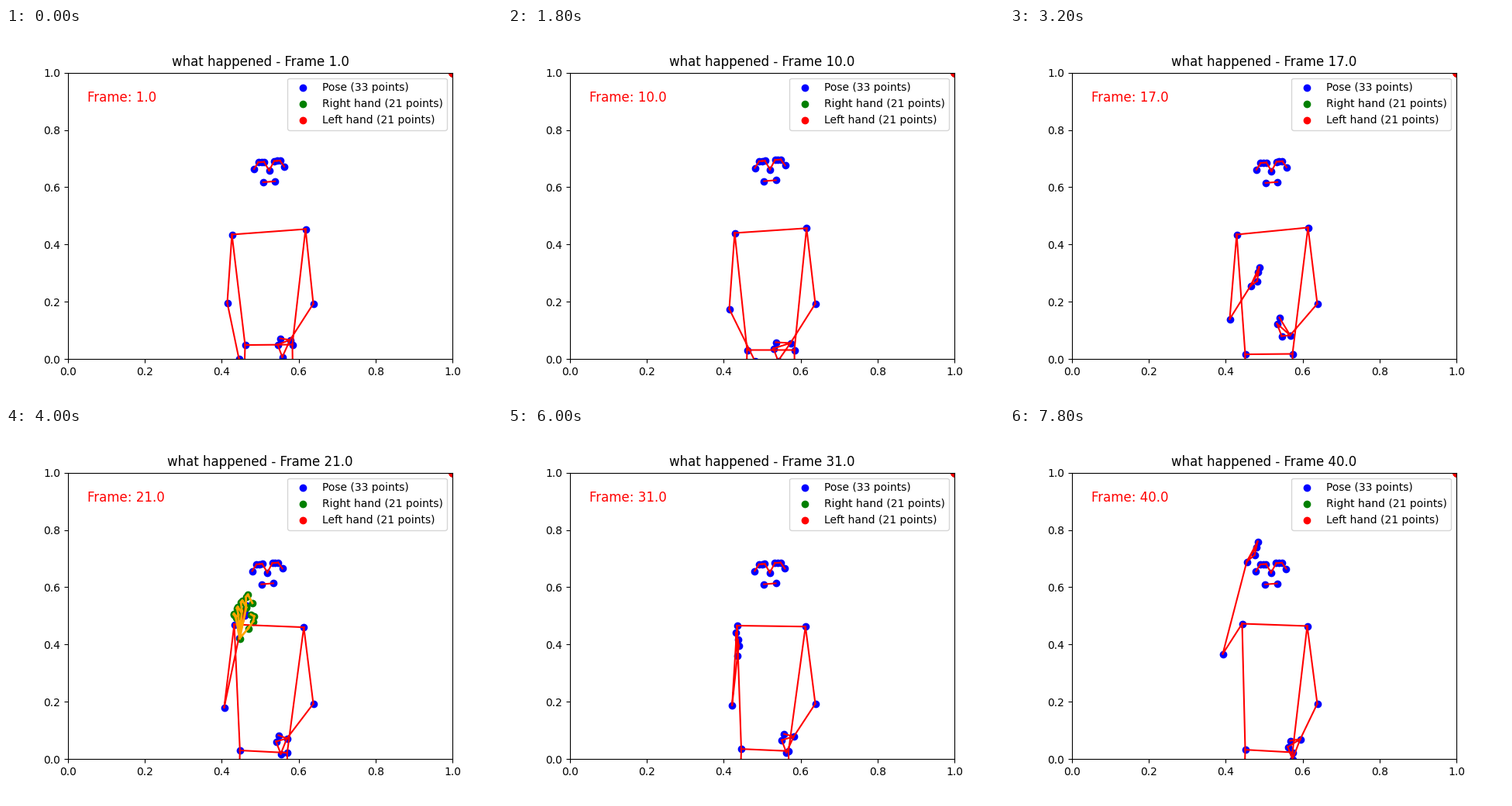
Write a matplotlib script that moves like this. It is 640 px wide and 480 px high and loops after 8000 ms.

```python
import matplotlib.pyplot as plt
import numpy as np
from matplotlib.animation import FuncAnimation

FRAMES = 40
STEP_MS = 200
HAND_SEEN = range(20, 27)

# Paths of the driving points: counter value -> stage pixels (y down).
# Every other joint follows from these by the rules in body_pose.
HEAD = {1: (339, -2.6), 10: (337.5, -4), 17: (336.9, -1.7), 21: (336.7, 0),
        35: (337.5, 0), 40: (336.4, 0.2)}
L_SHOULDER = {1: (386, 259), 17: (384, 257), 40: (383, 255)}
R_SHOULDER = {1: (291, 266), 10: (292, 264), 17: (292, 266), 21: (294, 253),
              27: (296, 252), 35: (294, 257), 40: (299, 252)}
L_HIP = {1: (369, 408), 10: (369, 415), 17: (364, 420), 27: (361, 416), 40: (364, 418)}
L_WRIST = {1: (366, 402), 10: (364, 406), 17: (361, 396), 21: (362, 400),
           35: (371, 397), 40: (374, 401)}
L_PALM = {1: (0, 1), 10: (-6, 2), 17: (-1, -20), 21: (2, -1), 35: (0, 0), 40: (0, 5)}
R_ELBOW = {1: (285, 354), 10: (285, 362), 17: (283, 375), 21: (281, 360),
           27: (284, 354), 35: (292, 360), 40: (274, 291)}
R_WRIST = {1: (300, 426), 10: (318, 429), 17: (310, 332), 21: (300, 270),
           27: (301, 306), 35: (290, 266), 40: (305, 172)}
R_INDEX = {1: (6, 28), 10: (16, 18), 17: (11, -24), 21: (9, -42),
           27: (4, -20), 35: (-6, -40), 40: (14, -26)}

BODY_LINKS = [
    (0, 1), (1, 2), (2, 3), (3, 7), (0, 4), (4, 5), (5, 6), (6, 8), (9, 10),
    (11, 12), (11, 23), (12, 24), (23, 24), (23, 25), (24, 26), (11, 13), (12, 14),
]
# Each arm ends in a wrist with pinky, index and thumb
for s in (0, 1):
    BODY_LINKS += [(13 + s, 15 + s), (15 + s, 17 + s), (15 + s, 19 + s),
                   (15 + s, 21 + s), (17 + s, 19 + s)]
HAND_LINKS = [(4 * f + j if j else 0, 4 * f + j + 1)
              for f in range(5) for j in range(4)]
CORNER = np.ones((21, 2))


def glide(path, t):
    """Smooth curve through the path's points without overshoot."""
    keys = np.array(list(path))
    v = np.array(list(path.values()), float)
    slope = np.diff(v, axis=0) / np.diff(keys)[:, None]
    a, b = slope[:-1], slope[1:]
    same = a * b > 0
    mid = np.where(same, 2 * a * b / np.where(same, a + b, 1), 0)
    tangent = np.vstack([slope[:1], mid, slope[-1:]])
    i = min(np.searchsorted(keys, t, side="right") - 1, len(keys) - 2)
    d = keys[i + 1] - keys[i]
    u = (t - keys[i]) / d
    ease = u * u * (3 - 2 * u)
    return (v[i] * (1 - ease) + v[i + 1] * ease
            + d * tangent[i] * u * (1 - u) ** 2
            - d * tangent[i + 1] * u * u * (1 - u))


def to_axes(points):
    p = np.asarray(points, float) + 0.5
    return np.column_stack([(p[:, 0] - 80) / 496, (427.2 - p[:, 1]) / 369.6])


def face(pose, head):
    """Mirrored halves around the nose, rolled slightly to one side."""
    pose[0] = head + (0, 186)
    for side, ids in ((1, (1, 2, 3, 7, 9)), (-1, (4, 5, 6, 8, 10))):
        half = ((6.5, 174.3), (10, 174.3), (14, 174.3), (19.5, 182.5), (7.7, 200.5))
        for j, (x, y) in zip(ids, half):
            pose[j] = head + (side * x, y - side * 0.08 * x)


def body_pose(t):
    pose = np.zeros((27, 2))
    face(pose, glide(HEAD, t))
    pose[11], pose[12] = glide(L_SHOULDER, t), glide(R_SHOULDER, t)
    # The hips tilt along with the raised shoulder
    tilt = 0.28 * (pose[12, 1] - 264)
    pose[23] = glide(L_HIP, t)
    pose[24] = pose[23] + (-61, tilt)
    pose[25], pose[26] = pose[23] + (2, 150), pose[24] + (-4, 150)

    pose[13], pose[15] = (396, 355.3), glide(L_WRIST, t)
    palm = pose[15] + glide(L_PALM, t)
    pose[17], pose[19], pose[21] = palm + (-10, 21), palm + (-16, 5), palm + (-13, -3)

    pose[14], pose[16] = glide(R_ELBOW, t), glide(R_WRIST, t)
    reach = glide(R_INDEX, t)
    pose[18] = pose[16] + reach * (0.5, 1.25) + (3, 24)
    pose[20] = pose[16] + reach
    pose[22] = pose[16] + reach * 0.72 + (2, 0)
    return pose


def hand_pose(wrist):
    """A bent thumb and four curled fingers fanned out from the wrist."""
    j = np.arange(4)
    thumb = np.column_stack([19 * np.sin(0.62 + 0.55 * j),
                             -13 - 18 * np.sin(j * np.pi / 6)])
    parts = [np.zeros((1, 2)), thumb]
    for k in range(4):
        angle = np.radians(78 + 7.5 * k)
        length = 40 - 4.5 * k
        x = length * np.cos(angle) + 1.5 * (j * j - 2 * j) + (1.2 - 0.8 * k) * j
        y = -length * np.sin(angle) - (18 - 4 * k) * np.sin(j * np.pi / 3.4)
        parts.append(np.column_stack([x, y]))
    return np.vstack(parts) + wrist + (1, 1)


def set_links(line, points, links):
    gap = [np.nan, np.nan]
    path = np.array([p for a, b in links for p in (points[a], points[b], gap)])
    line.set_data(path[:, 0], path[:, 1])


fig, ax = plt.subplots(figsize=(6.4, 4.8), dpi=100)
ax.set_xlim(0, 1)
ax.set_ylim(0, 1)
body_dots = ax.scatter([], [], c="blue", label="Pose (33 points)")
right_dots = ax.scatter([], [], c="green", label="Right hand (21 points)")
left_dots = ax.scatter(*CORNER.T, c="red", label="Left hand (21 points)")
body_lines, = ax.plot([], [], color="red", lw=1.5)
hand_lines, = ax.plot([], [], color="orange", lw=2)
title = ax.set_title("")
counter = ax.text(0.05, 0.9, "", color="red", fontsize=12, transform=ax.transAxes)
ax.legend(loc="upper right")


def update(i):
    n = i + 1
    pose = body_pose(n)
    body = to_axes(pose)
    body_dots.set_offsets(body)
    set_links(body_lines, body, BODY_LINKS)
    if n in HAND_SEEN:
        hand = to_axes(hand_pose(pose[16]))
        right_dots.set_offsets(hand)
        set_links(hand_lines, hand, HAND_LINKS)
    else:
        right_dots.set_offsets(CORNER)
        hand_lines.set_data([], [])
    title.set_text(f"what happened - Frame {n:.1f}")
    counter.set_text(f"Frame: {n:.1f}")
    return body_dots, right_dots, body_lines, hand_lines, title, counter


anim = FuncAnimation(fig, update, frames=FRAMES, interval=STEP_MS,
                     repeat=True, repeat_delay=0, blit=False)
plt.show()
```
